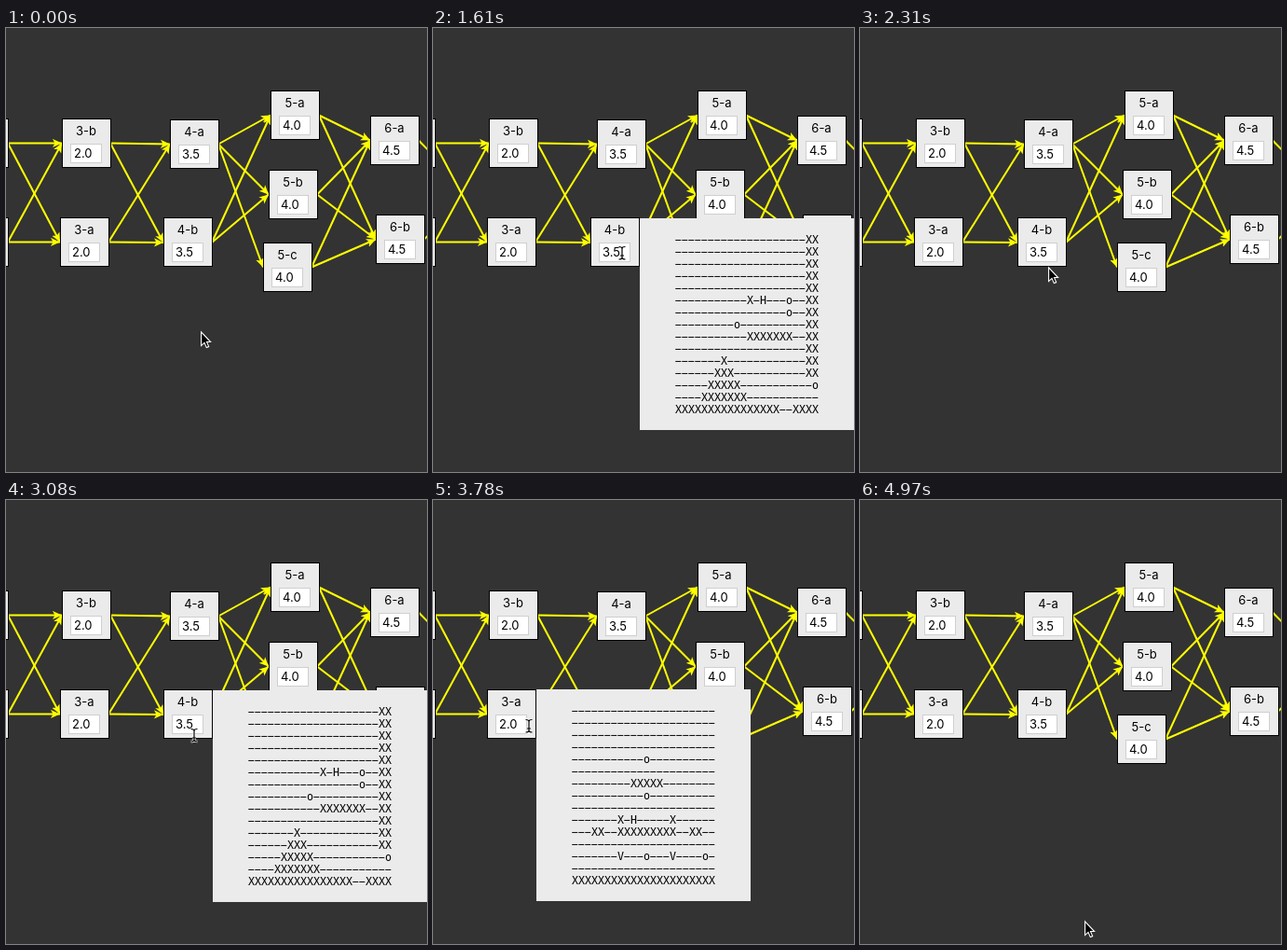
Write an HTML page that moves like this. It is 452 px wide and 476 px high and loops after 5040 ms.

```html
<!DOCTYPE html>
<html lang="en">
<head>
<meta charset="utf-8">
<title>Level graph</title>
<style>
  html, body { margin: 0; width: 100%; height: 100%; overflow: hidden; background: #333; }
  svg { display: block; width: 452px; height: 476px; }
  .edge { stroke: #ff0; stroke-width: 2; marker-end: url(#head); }
  .card { fill: #ebebeb; stroke: #000; }
  .field { fill: #fff; stroke: #cfcfcf; }
  .label { font: 13px Inter, sans-serif; }
  .map { font: 11.63px "DejaVu Sans Mono", monospace; }
  .arrow { fill: #000; stroke: #fff; stroke-width: 1.1; }
  .beam { fill: none; stroke: #000; stroke-width: 1.2; }
  .halo { stroke: #fff; stroke-width: 2.6; }
</style>
</head>
<body>
<svg id="stage" viewBox="0 0 452 476">
  <defs>
    <marker id="head" markerUnits="userSpaceOnUse" markerWidth="12" markerHeight="12"
            refX="10" refY="5" orient="auto">
      <path d="M0 .4L10 5L0 9.6L2.5 5z" fill="#ff0"/>
    </marker>
    <path id="caret" d="M-3.5-6.5Q0-6.5 0-4.5Q0-6.5 3.5-6.5M0-5V5.5M-3.5 7Q0 7 0 5Q0 7 3.5 7M-2 3H2"/>
  </defs>
  <g id="edges"></g>
  <g id="nodes"></g>
  <g id="popups"></g>
  <g id="cursor">
    <path id="arrow" class="arrow" d="M.6 .9V15.6L4 12.4L6.3 17.6L8.7 16.6L6.5 11.5H10.6z"/>
    <g id="beam"><use href="#caret" class="beam halo"/><use href="#caret" class="beam"/></g>
  </g>
</svg>
<script>
const LOOP = 5040, STEP = 70;
const $ = id => document.getElementById(id);

function add(parent, tag, attrs, text = '') {
  const el = document.createElementNS('http://www.w3.org/2000/svg', tag);
  for (const key in attrs) el.setAttribute(key, attrs[key]);
  el.textContent = text;
  return parent.appendChild(el);
}

// name: [left, top, value]
const nodes = {
  '2-b': [-50, 97, '1.0'], '2-a': [-50, 203, '1.0'],
  '3-b': [60, 97, '2.0'], '3-a': [58, 203, '2.0'],
  '4-a': [176, 98, '3.5'], '4-b': [169, 203.5, '3.5'],
  '5-a': [284, 67, '4.0'], '5-b': [282, 152, '4.0'], '5-c': [276, 230, '4.0'],
  '6-a': [391, 94, '4.5'], '6-b': [397, 200, '4.5'],
  '7-a': [500, 152, '5.0']
};
const links = {
  '2-b': '3-b 3-a', '2-a': '3-b 3-a', '3-b': '4-a 4-b', '3-a': '4-a 4-b',
  '4-a': '5-a 5-b 5-c', '4-b': '5-a 5-b',
  '5-a': '6-a 6-b', '5-b': '6-a 6-b', '5-c': '6-a 6-b',
  '6-a': '7-a', '6-b': '7-a'
};

for (const from in links) {
  const [x1, y1] = nodes[from];
  for (const to of links[from].split(' ')) {
    const [x2, y2] = nodes[to];
    add($('edges'), 'line', { class: 'edge', x1: x1 + 52, y1: y1 + 26.5, x2, y2: y2 + 26.5 });
  }
}

for (const name in nodes) {
  const [left, top, value] = nodes[name], x = left, y = Math.floor(top);
  const g = add($('nodes'), 'g', { transform: `translate(${x} ${y})` });
  add(g, 'rect', { class: 'card', x: .5, y: .5, width: 52, height: 52 });
  add(g, 'text', { class: 'label', x: 26, y: 18, 'text-anchor': 'middle' }, name);
  add(g, 'rect', { class: 'field', x: 9.5, y: 27.5, width: 33, height: 20 });
  add(g, 'text', { class: 'label', x: 13, y: 42 }, value);
}

const blank = '-'.repeat(22), wall = '-'.repeat(20) + 'XX';
const towerMap = [
  wall, wall, wall, wall, wall,
  '-----------X-H---o--XX',
  '-----------------o--XX',
  '---------o----------XX',
  '-----------XXXXXXX--XX',
  wall,
  '-------X------------XX',
  '------XXX-----------XX',
  '-----XXXXX-----------o',
  '----XXXXXXX-----------',
  'XXXXXXXXXXXXXXXX--XXXX'
];
const bridgeMap = [
  blank, blank, blank, blank,
  '-----------o----------',
  blank,
  '---------XXXXX--------',
  '-----------o----------',
  blank,
  '-------X-H-----X------',
  '---XX--XXXXXXXXX--XX--',
  blank,
  '-------V---o---V----o-',
  blank,
  'X'.repeat(22)
];

function popup(x, y, rows, spans) {
  const el = add($('popups'), 'g', { transform: `translate(${x} ${y})` });
  add(el, 'rect', { width: 230, height: 227, fill: '#ebebeb' });
  rows.forEach((row, i) =>
    add(el, 'text', { class: 'map', x: 38, y: 27 + 13 * i }, row.replaceAll('-', '\u2212')));
  return { el, spans };
}
const popups = [
  popup(222, 204, towerMap, [[630, 1750], [2380, 3150]]),
  popup(111, 203, bridgeMap, [[3710, 4620]])
];
const beamSpans = [[630, 1750], [2450, 3150], [3780, 4550]];

// [time, x, y] of the pointer
const path = [
  [0, 209, 325], [140, 208, 321], [280, 207, 307], [420, 205, 285], [560, 204, 262],
  [630, 203, 249], [700, 203, 240], [1540, 203, 240], [1610, 203, 241], [1680, 203, 248],
  [1750, 202, 257], [1820, 202, 261], [2100, 202, 261], [2310, 201.5, 255.5],
  [2380, 202, 253], [2520, 202, 247], [3010, 202, 247], [3080, 202, 252],
  [3150, 200, 260], [3290, 178, 266], [3430, 142, 256], [3570, 116, 243],
  [3640, 112, 239.5], [3710, 106, 241], [3850, 100, 243], [4410, 100, 243],
  [4480, 100, 249], [4550, 100, 256], [4620, 115, 280], [4690, 142, 316],
  [4760, 176, 364], [4830, 208, 408], [4900, 231, 438], [4970, 241, 451], [LOOP, 241, 451]
];

function pointerAt(t) {
  const i = path.findIndex(p => p[0] > t);
  const [t0, x0, y0] = path[i - 1], [t1, x1, y1] = path[i];
  const k = (t - t0) / (t1 - t0);
  return [x0 + (x1 - x0) * k, y0 + (y1 - y0) * k];
}

const within = (spans, t) => spans.some(([from, to]) => t >= from && t < to);
const show = (el, on) => el.setAttribute('visibility', on ? 'visible' : 'hidden');

function draw(ms) {
  const t = Math.floor((ms % LOOP) / STEP) * STEP;
  const [x, y] = pointerAt(t).map(Math.round);
  const typing = within(beamSpans, t);
  $('cursor').setAttribute('transform', `translate(${x} ${y})`);
  show($('arrow'), !typing);
  show($('beam'), typing);
  for (const { el, spans } of popups) show(el, within(spans, t));
}

const start = performance.now();
function tick(now) {
  draw(Math.max(0, now - start));
  requestAnimationFrame(tick);
}
draw(0);
requestAnimationFrame(tick);
</script>
</body>
</html>
```
